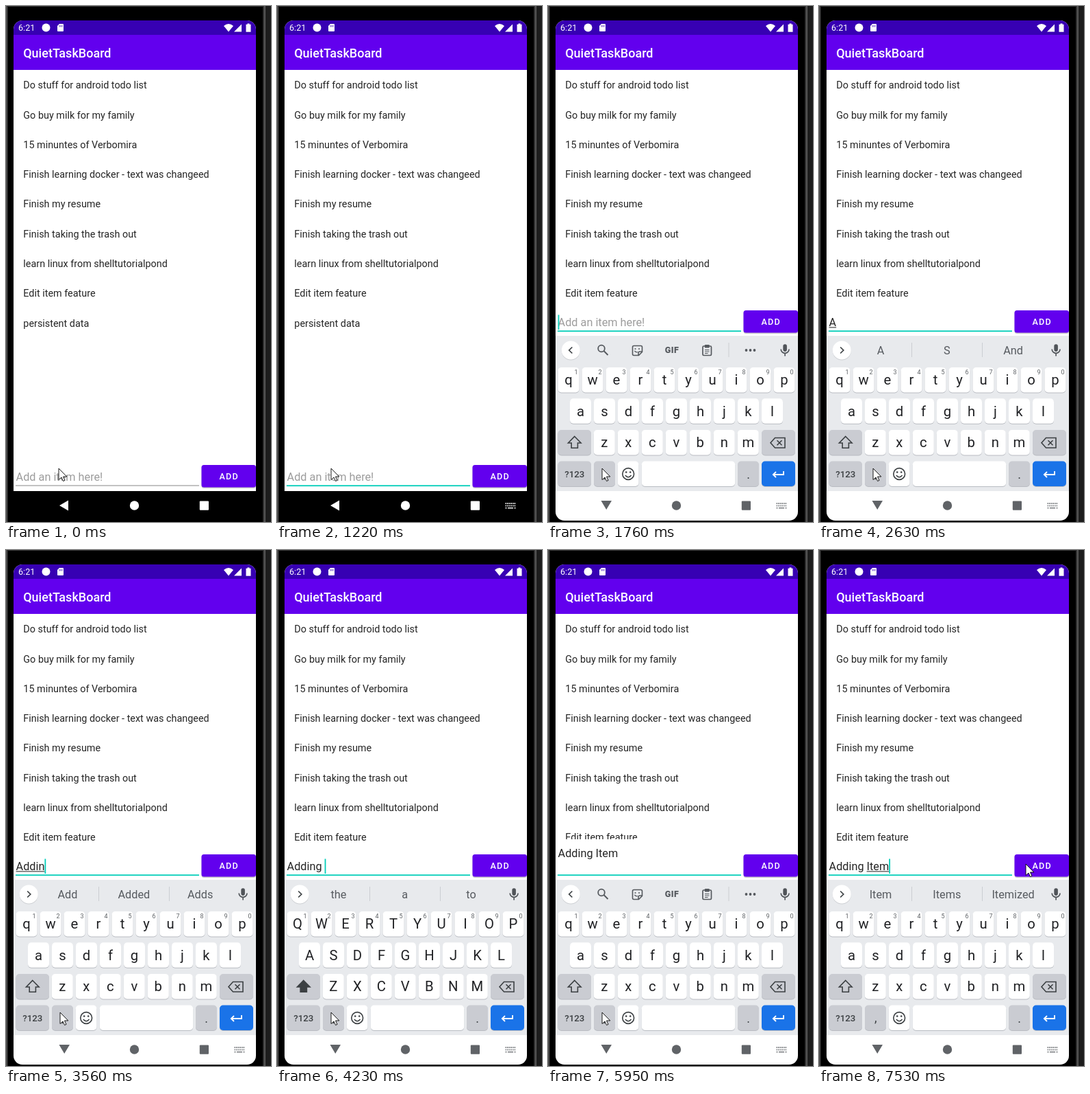
An HTML page that plays this animation: 387 px wide and 751 px high, repeating every 8000 ms.

```html
<!DOCTYPE html>
<html lang="en">
<head>
<meta charset="utf-8">
<style>
  html, body { margin: 0; width: 100%; height: 100%; overflow: hidden; background: #000; }
  svg { display: block; width: 387px; height: 751px; font-family: Roboto, sans-serif; white-space: pre; }
</style>
</head>
<body>
<svg id="stage" viewBox="0 0 387 751"></svg>
<script>
const LOOP = 8000, FIELD_SIZE = 16.25, FIELD_X = 14.6;
const TEAL = '#03cdb9', PURPLE = '#6200ee', INK = '#3c4043';

const items = ['Do stuff for android todo list', 'Go buy milk for my family', '15 minuntes of Verbomira',
  'Finish learning docker - text was changeed', 'Finish my resume', 'Finish taking the trash out',
  'learn linux from shelltutorialpond', 'Edit item feature', 'persistent data'];

// Each entry changes part of the state at its time; mark is where the composing underline begins.
const events = [
  [0, { cursor: [77, 673], text: '', mark: -1, caret: 0, focus: 0, ime: 0, board: 0, slide: 0,
        back: 'left', upper: 0, words: null, lines: 1 }],
  [120, { cursor: [79, 673] }],
  [430, { caret: 1 }],
  [550, { focus: 1 }],
  [800, { ime: 1 }],
  [1220, { caret: 0 }],
  [1350, { board: 1, slide: 120 }],
  [1510, { slide: 10 }],
  [1630, { slide: 0, back: 'down' }],
  [1760, { caret: 1 }],
  [1890, { text: 'A' }],
  [2200, { mark: 0, words: ['A', 'S', 'And'] }],
  [2630, { caret: 0 }],
  [3080, { text: 'Ad', caret: 1 }],
  [3200, { text: 'Add', words: ['Ad', 'Add', 'And'] }],
  [3320, { text: 'Addi', words: ['Add', 'Added', 'Adds'] }],
  [3450, { text: 'Addin' }],
  [3570, { text: 'Adding' }],
  [3690, { words: ['Adding', 'Adding a', 'Aiding'] }],
  [3980, { text: 'Adding ', mark: -1, words: ['the', 'a', 'to'] }],
  [4230, { upper: 1 }],
  [4350, { text: 'Adding I', mark: 7 }],
  [4470, { words: ['I', "I'm", 'In'] }],
  [4590, { upper: 0 }],
  [4740, { text: 'Adding It', words: ['It', "It's", 'Its'] }],
  [4870, { text: 'Adding Ite', words: ['Ite', 'Item', 'Items'] }],
  [4990, { text: 'Adding Item' }],
  [5130, { words: ['Item', 'Items', 'Itemized'] }],
  [5260, { lines: 2, mark: -1 }],
  [5380, { words: null }],
  [5950, { caret: 0 }],
  [6370, { lines: 1, caret: 1 }],
  [6490, { mark: 7, words: ['Item', 'Items', 'Itemized'] }],
  [6890, { cursor: [168, 542] }],
  [7030, { cursor: [204, 514], caret: 0 }],
  [7160, { cursor: [242, 488] }],
  [7280, { cursor: [272, 468] }],
  [7410, { cursor: [293, 459] }],
  [7530, { cursor: [302, 457], caret: 1 }]
];

const pen = document.createElement('canvas').getContext('2d');
const widthOf = s => { pen.font = FIELD_SIZE + 'px Roboto, sans-serif'; return pen.measureText(s).width; };

const rect = (x, y, w, h, fill, rx = 0, more = '') =>
  `<rect x="${x}" y="${y}" width="${w}" height="${h}" fill="${fill}" rx="${rx}" ${more}/>`;
const circle = (x, y, r, fill, more = '') => `<circle cx="${x}" cy="${y}" r="${r}" fill="${fill}" ${more}/>`;
const text = (x, y, s, size, fill, more = '') =>
  `<text x="${x}" y="${y}" font-size="${size}" fill="${fill}" ${more}>${s}</text>`;
const mid = (x, y, s, size, fill, more = '') => text(x, y, s, size, fill, 'text-anchor="middle" ' + more);
const fill = (d, color, more = '') => `<path d="${d}" fill="${color}" ${more}/>`;
const line = (d, color, w = 1.6, more = '') =>
  `<path d="${d}" fill="none" stroke="${color}" stroke-width="${w}" ${more}/>`;

function device() {
  return rect(0, 0, 387, 751, '#000') + rect(0, 0, 387, 1, '#3a3a3a') +
    rect(0, 0, 2, 751, '#4a4a4a') + rect(2, 0, 1, 751, '#1c1c1c') +
    rect(375, 0, 1.5, 751, '#2c2c2c') + rect(376.5, 0, 2.5, 751, '#555') + rect(379, 0, 8, 751, '#1d1d1d');
}

function header() {
  return rect(11, 21, 354, 22, '#3700b3') + rect(11, 42, 354, 51, PURPLE) +
    text(18, 36.3, '6:21', 12.6, '#fff') + circle(58.5, 31.5, 6, '#fff') +
    fill('M78 26h5q1 0 1 1v9q0 1-1 1h-7q-1 0-1-1v-7z', '#fff') +
    line('M78 28v2.5M80 28v2.5M82 28v2.5', '#3700b3', .8) +
    fill('M318 29q7-6 14 0l-7 8.5z', '#fff') + fill('M333 37.5l11-11v11z', '#fff') +
    fill('M352.5 25.5h3v1.2h2v11h-7v-11h2z', '#fff') +
    text(25.2, 75.2, 'QuietTaskBoard', 18, '#fff', 'font-weight="500"');
}

function field(s) {
  const dy = s.board ? 0 : 225, extra = s.lines > 1;
  const top = (extra ? 421 : 440) + dy, base = (extra ? 447 : 466) + dy;
  const end = FIELD_X + widthOf(s.text);
  let out = rect(11, top, 354, 706 - top, '#fff');
  out += s.text ? text(FIELD_X, base, s.text, FIELD_SIZE, '#252525')
                : text(FIELD_X, base, 'Add an item here!', FIELD_SIZE, '#9c9c9c');
  if (s.mark >= 0) {
    const from = FIELD_X + widthOf(s.text.slice(0, s.mark));
    out += rect(from, 467.3, end - from, 1.1, '#333');
  }
  if (s.caret) out += rect(extra ? FIELD_X : end, 449.5 + dy, 1.8, 21.5, TEAL);
  out += s.focus ? rect(14, 472.3 + dy, 268, 1.8, TEAL) : rect(14, 472.5 + dy, 268, 1, '#858585');
  return out + rect(285.5, 444 + dy, 79.5, 33, '#0003', 3.5) + rect(285.5, 443 + dy, 79.5, 32.6, PURPLE, 3.5) +
    text(311.6, 464.4 + dy, 'ADD', 12.6, '#fff', 'font-weight="500" letter-spacing="1.13"');
}

function nav(s) {
  const c = s.board ? '#606367' : '#fff', dim = s.board ? '#85888b' : '#ddd';
  let out = s.back == 'left' ? fill('M78 727l13-7.5v15z', c) : fill('M77.5 720h15.5l-7.8 13z', c);
  out += circle(187.5, 727, 6.7, c) + rect(282.8, 720.5, 13.2, 13.2, c, 1);
  if (s.ime) out += line('M333.5 724h15M333.5 727.3h15', dim, 1.8, 'stroke-dasharray="1.7 .9"') +
    line('M333.5 730.6h2M337 730.6h8M346.5 730.6h2', dim, 1.8);
  return out;
}

function key(x, y, w, color = '#fff') {
  return rect(x, y + 1, w, 36.5, '#b9bcc2', 5) + rect(x, y, w, 36.5, color, 5);
}

function toolbar(words) {
  let out = circle(33.3, 502, 13.6, '#ccced2') + circle(33.3, 501, 13.5, '#fff') +
    line(words ? 'M31.2 496.5l4.6 4.5-4.6 4.5' : 'M35.4 496.5l-4.6 4.5 4.6 4.5', INK, 1.7);
  if (words) {
    out += rect(135, 490, 1, 21, '#cbced2') + rect(238, 490, 1, 21, '#cbced2');
    words.forEach((w, i) => out += mid(90 + 96.8 * i, 507, w, 16.3, '#575b60'));
  } else {
    const c = '#55595e';
    out += circle(78, 498.5, 4.8, 'none', `stroke="${c}" stroke-width="1.8"`) + line('M81.5 502l6 6', c, 2) +
      line('M125.5 494.5h10q2 0 2 2v7l-5 5h-7q-2 0-2-2v-10q0-2 2-2zM137 503h-3q-2 0-2 2v3', c, 1.6) +
      circle(127.5, 499, 1, c) + circle(133, 499, 1, c) + line('M126.5 502q2 2.5 4.5 1.5', c, 1.3) +
      mid(181, 505.3, 'GIF', 12.5, c, 'font-weight="900" letter-spacing=".5"') +
      rect(226, 495, 12.5, 13.5, 'none', 1.5, `stroke="${c}" stroke-width="1.7"`) +
      rect(228.8, 493, 7, 4.5, c, 1) + line('M229 500.5h6.5M229 503h6.5M229 505.5h4.5', c, 1.2) +
      rect(263.5, 490, 1, 21, '#cbced2') + [289.5, 295.5, 301.5].map(x => circle(x, 501, 1.9, c)).join('');
  }
  return out + rect(343.3, 492.3, 5.6, 10.6, '#505459', 2.8) +
    line('M340.2 499.5a5.9 5.9 0 0 0 11.8 0M346.1 505.5v4', '#505459', 1.7);
}

function keyboard(s) {
  const MOD = '#caccd2';
  let out = rect(11, 480, 354, 226, '#e8eaed') + toolbar(s.words);
  [['qwertyuiop', 30, 526], ['asdfghjkl', 47.5, 571.3], ['zxcvbnm', 82.3, 617]].forEach(([row, x0, y], r) =>
    [...row].forEach((ch, i) => {
      const x = x0 + 35 * i;
      out += key(x - 15.5, y, 31) + mid(x, y + 25.3, s.upper ? ch.toUpperCase() : ch, 20.3, '#202124');
      if (!r) out += mid(x + 11, y + 9.8, (i + 1) % 10, 9, '#5c6064');
    }));
  out += key(14.5, 617, 48.5, MOD) + key(312, 617, 49, MOD) + key(14.5, 662.5, 48.5, MOD) +
    key(67, 662.5, 31, MOD) + key(101.8, 662.5, 30.6) + key(136.8, 662.5, 136.4) +
    key(277, 662.5, 31, MOD) + key(312, 662.5, 49, '#1a73e8');
  out += fill('M38.8 626.5l9.3 9.5h-4.7v7.2h-9.2v-7.2h-4.7z', s.upper ? INK : 'none',
    `stroke="${INK}" stroke-width="1.6"`);
  out += line('M331.5 628.5h14.5v14.5h-14.5l-6.5-7.2zM334.5 632.3l7 7M341.5 632.3l-7 7', INK, 1.6);
  out += mid(38.8, 686, '?123', 13.3, INK, 'font-weight="500"') + mid(82.8, 687, ',', 18, INK) +
    mid(292.5, 688, '.', 18, INK);
  out += circle(117.2, 681, 8.4, 'none', `stroke="${INK}" stroke-width="1.6"`) + circle(114.2, 678.5, 1.3, INK) +
    circle(120.2, 678.5, 1.3, INK) + line('M112.8 683q4.4 5.4 8.8 0', INK, 1.5);
  return out + line('M344 677v5h-15M333 678l-4.2 4 4.2 4', '#fff', 1.8);
}

function render(s) {
  const list = items.map((t, i) => text(25.3, 120.2 + 43.3 * i, t, 14.4, '#252525')).join('');
  return device() + '<clipPath id="glass"><rect x="11" y="21" width="354" height="728" rx="13"/></clipPath>' +
    '<g clip-path="url(#glass)">' + rect(11, 21, 354, 685, '#fff') + header() + list + field(s) +
    rect(11, 706, 354, 44, s.board ? '#fff' : '#000') +
    (s.board ? `<g transform="translate(0 ${s.slide})">${keyboard(s)}</g>` : '') + nav(s) + '</g>' +
    fill('M0 0V16.5L4 13L6.6 18.5L9 17.4L6.5 12H11.8Z', '#fff',
      `stroke="#000" stroke-width=".9" transform="translate(${s.cursor})"`);
}

const states = [];
events.forEach(([, change], i) => states.push({ ...states[i - 1], ...change }));

const stage = document.getElementById('stage'), start = performance.now();
let shown = -1;
function tick() {
  const t = (performance.now() - start) % LOOP;
  const now = events.filter(e => e[0] <= t).length - 1;
  if (now !== shown) stage.innerHTML = render(states[shown = now]);
  requestAnimationFrame(tick);
}
tick();
</script>
</body>
</html>
```
